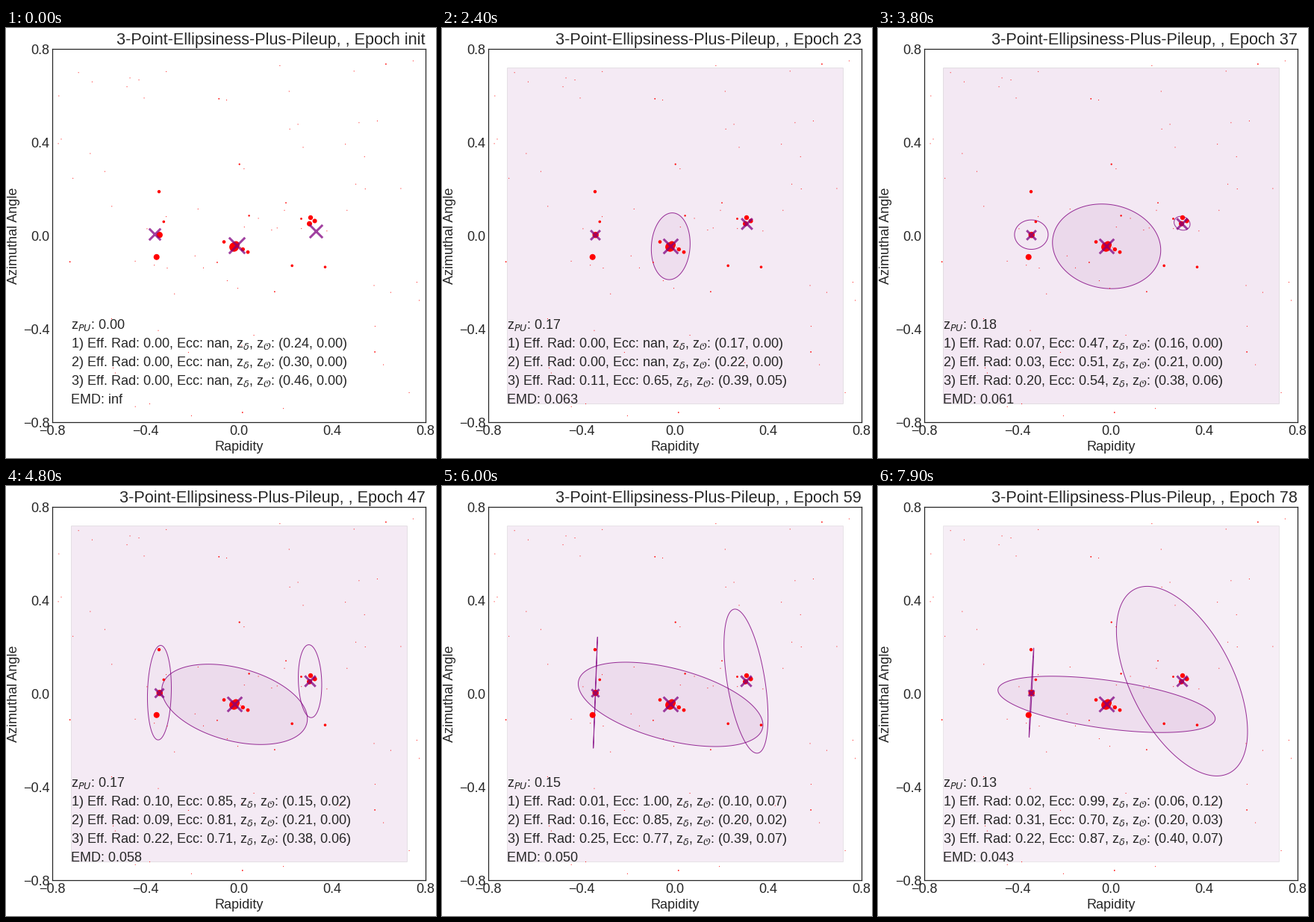
These frames come from a looping animation (576 by 576 pixels, 8 s). A matplotlib script:

```python
import numpy as np
import matplotlib.pyplot as plt
from matplotlib.animation import FuncAnimation
from matplotlib.colors import to_rgba
from matplotlib.patches import Polygon, Rectangle

FRAMES, INTERVAL = 80, 100
SCALE = 312.5          # pixels per data unit
ORIGIN = (312, 278)    # stage pixel of the data origin
KEYS = [24, 38, 48, 60, 71, 79]

plt.style.use("seaborn-v0_8-white")
plt.rcParams.update({"font.size": 18, "font.sans-serif": ["Liberation Sans"],
                     "axes.titlesize": "large", "axes.labelsize": "medium",
                     "xtick.labelsize": "medium", "ytick.labelsize": "medium",
                     "axes.linewidth": 1.25})

# Main particles: x, y, radius in stage pixels
CORE = np.array([
    (205, 219, 2.2), (211.3, 259.3, 1.8), (205.7, 277, 4.2), (201.7, 306.6, 4),
    (305.4, 293.2, 6.3), (308, 290.3, 5), (317.3, 296.3, 2.7), (324, 300, 2.4),
    (292, 286.3, 2.3), (325.6, 251.2, 1.2), (312.7, 182.3, 1.1),
    (395.5, 255.3, 1.4), (408, 253.8, 3.2), (406.5, 262, 3.5),
    (413.6, 258.3, 3), (427.5, 320, 1.8), (383.2, 318.2, 1.8)])

# centre: start and end pixel; delta: start, early change, late change;
# orb: early and late share; birth and key poses of the ellipse
JETS = [
    dict(start=(198.7, 275.3), end=(205.5, 276.6), delta=(.24, -.08, -.10),
         orb=(0, .12), birth=27, half_w=[22.5, 16, 2.8, 7.3, 3.2],
         half_h=[19.7, 63.3, 74.5, 69, 59.7], skew=[0, -.1, -.998, -.998, -.979]),
    dict(start=(414.7, 271.5), end=(407.2, 261.2), delta=(.30, -.09, -.01),
         orb=(0, .03), birth=33, half_w=[10.7, 15.7, 29.5, 67.3, 87.8],
         half_h=[9.3, 48.8, 96.5, 111.5, 127], skew=[.15, .1, .5, .468, .53]),
    dict(start=(308.5, 290.5), end=(306.2, 292.3), delta=(.46, -.08, .02),
         orb=(.068, 0), birth=8, half_w=[26, 72.5, 97.5, 123.7, 140.7, 145.5],
         half_h=[44.7, 56.7, 53.8, 56.5, 47, 37.7],
         skew=[-.08, .09, .36, .487, .52, .506]),
]


def to_data(x, y):
    return (np.asarray(x) - ORIGIN[0]) / SCALE, (ORIGIN[1] - np.asarray(y)) / SCALE


def settle(t, tau=9):
    return 1 - np.exp(-t / tau)


def smooth(t, start, end):
    u = np.clip((t - start) / (end - start), 0, 1)
    return u * u * (3 - 2 * u)


def pose(t, birth, values):
    return np.interp(t, [birth, *KEYS[-len(values):]], [0, *values])


def outline(cx, cy, hw, hh, skew):
    a = np.linspace(0, 2 * np.pi, 241)
    return np.column_stack(to_data(cx + hw * np.cos(a),
                                   cy + hh * np.cos(a - np.arccos(skew))))


def radius_and_ecc(hw, hh, skew):
    """Effective radius and flattening from the ellipse's covariance."""
    if hw == 0:
        return 0, np.nan
    c = skew * hw * hh
    minor, major = np.sqrt(np.linalg.eigvalsh([[hw * hw, c], [c, hh * hh]]))
    return np.sqrt(minor * major) / SCALE, 1 - .6 * minor / major


fig, ax = plt.subplots(figsize=(8, 8), dpi=72)
fig.subplots_adjust(left=62 / 576, right=562 / 576, bottom=47.8 / 576, top=547.8 / 576)
ticks = [-.8, -.4, 0, .4, .8]
ax.set(xlim=(-.8, .8), ylim=(-.8, .8), xticks=ticks, yticks=ticks,
       xlabel="Rapidity", ylabel="Azimuthal Angle")

rng = np.random.default_rng(7)
specks = rng.uniform(-.78, .78, (2, 78))
ax.scatter(*specks, s=rng.choice([1.2, 3], 78, p=[.88, .12]), c="red", lw=0, zorder=2)
ax.scatter(*to_data(*CORE.T[:2]), s=(2 * CORE[:, 2]) ** 2, c="red", lw=0, zorder=2)

box = ax.add_patch(Rectangle((-.72, -.72), 1.44, 1.44, lw=1, zorder=1))
rings = [ax.add_patch(Polygon([(0, 0)], lw=1, ec=to_rgba("purple", .8),
                              joinstyle="round", zorder=1.5)) for _ in JETS]
marks = [ax.scatter([0], [0], marker="x", c="purple", lw=3, alpha=.75, zorder=3)
         for _ in JETS]
lines = [ax.text(-.72, -.4 - .08 * i, "", zorder=4) for i in range(5)]


def draw(t):
    epoch = t - 1 if t else "init"
    ax.set_title(f"3-Point-Ellipsiness-Plus-Pileup, , Epoch {epoch}", loc="right")

    early, late = settle(t), smooth(t, 38, 79)
    z_pu = .18 * early - .05 * np.clip((t - 42) / 28, 0, 1)
    box.set(facecolor=to_rgba("purple", z_pu / 2), edgecolor=to_rgba("black", z_pu / 2))
    lines[0].set_text(f"z$_{{PU}}$: {z_pu:.2f}")

    for i, (jet, ring, mark) in enumerate(zip(JETS, rings, marks)):
        x, y = np.add(jet["start"], early * np.subtract(jet["end"], jet["start"]))
        delta = np.dot(jet["delta"], (1, early, late))
        orb = np.dot(jet["orb"], (settle(t, 16), late))
        shape = [pose(t, jet["birth"], jet[k]) for k in ("half_w", "half_h", "skew")]
        rad, ecc = radius_and_ecc(*shape)

        ring.set_visible(rad > 0)
        ring.set_xy(outline(x, y, *shape))
        ring.set_facecolor(to_rgba("purple", orb))
        mark.set_offsets([to_data(x, y)])
        mark.set_sizes([1000 * delta])
        lines[i + 1].set_text(
            f"{i + 1}) Eff. Rad: {rad:.2f}, Ecc: {ecc:.2f}, "
            rf"z$_{{\delta}}$, z$_{{\mathcal{{O}}}}$: ({delta:.2f}, {orb:.2f})")

    emd = .091 - .03 * early - .018 * smooth(t, 38, 76) if t else np.inf
    lines[4].set_text(f"EMD: {emd:.3f}")
    return [box, *rings, *marks, *lines]


anim = FuncAnimation(fig, draw, frames=FRAMES, interval=INTERVAL, repeat=True,
                     repeat_delay=0, blit=False)
plt.show()
```
